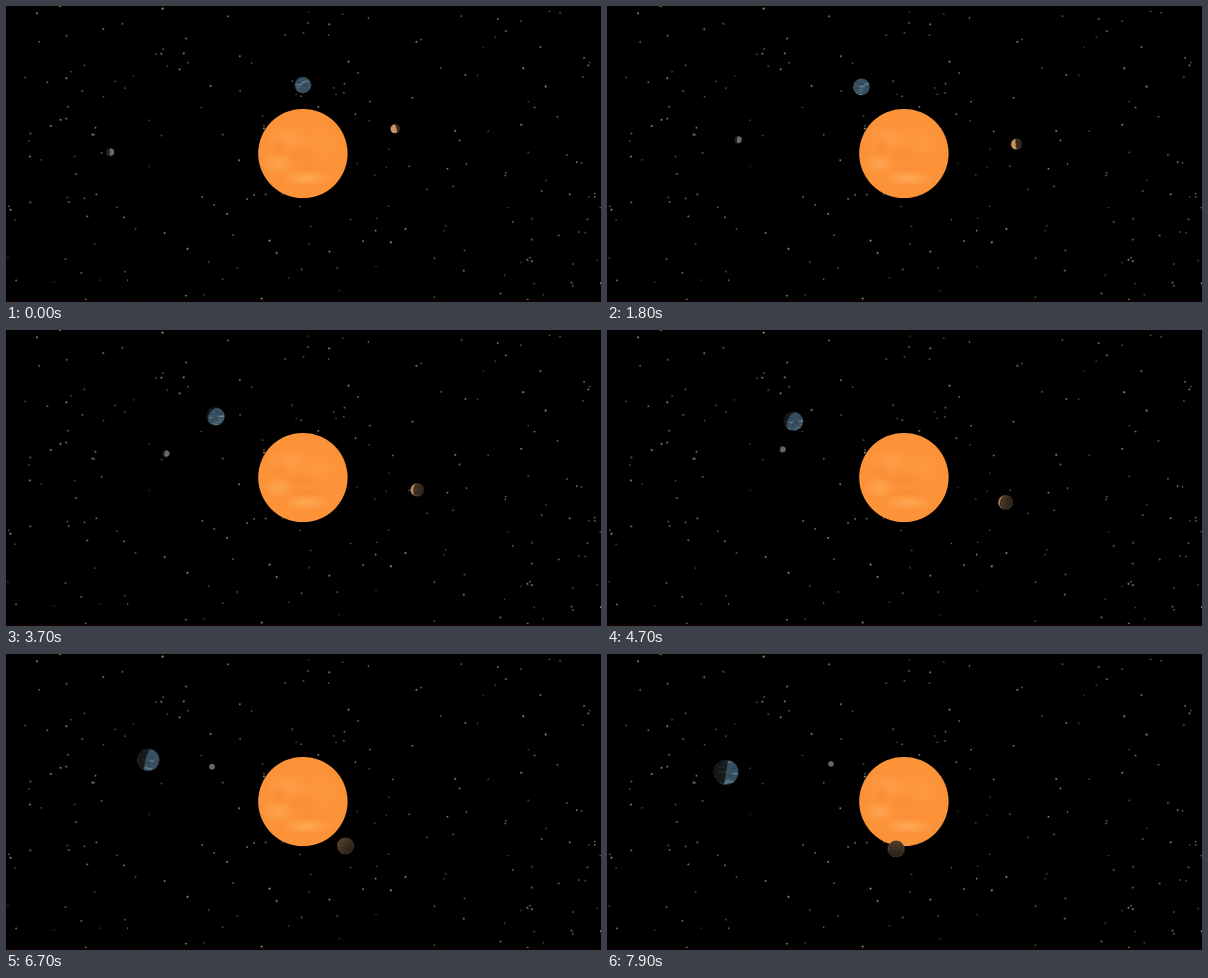
Write an HTML page with a canvas that moves like this. It is 600 px wide and 299 px high and loops after 8000 ms.

```html
<!DOCTYPE html>
<html lang="en">
<head>
<meta charset="utf-8">
<title>Orbits</title>
<style>
html, body { margin: 0; width: 100%; height: 100%; overflow: hidden; background: #000; }
canvas { display: block; }
</style>
</head>
<body>
<canvas id="sky" width="600" height="299"></canvas>
<script>
const W = 600, H = 299, LOOP = 8000, STEP = 100, TAU = Math.PI * 2;
const SUN = { x: 299.4, y: 149, r: 45.1 };
const ctx = document.getElementById('sky').getContext('2d');

// Orbits in perspective: start angle and speed in radians, half width and
// height, vertical lift, depth strength, and the planet's radius.
const PLANETS = [
  { start: -1.471, speed: .1147, width: 207, height: 75, lift: -6, depth: .6, radius: 4.2,
    base: '#6b6761', light: '#8a867f', dark: '#4a4742' },
  { start: 0, speed: -.2, width: 178.5, height: 73.3, lift: 30.2, depth: .5, radius: 12.4,
    base: '#38505f', light: '#7690a2', dark: '#24384a' },
  { start: 1.281, speed: .241, width: 108, height: 44.1, lift: 15.3, depth: .4, radius: 5.05,
    base: '#c69462', light: '#d8aa74', dark: '#ae7c4e' }
];

function random(seed) {
  return () => (seed = (seed * 16807) % 2147483647) / 2147483647;
}

function disc(c, x, y, r, fill) {
  c.fillStyle = fill;
  c.beginPath();
  c.arc(x, y, r, 0, TAU);
  c.fill();
}

function glow(c, x, y, rx, ry, rgb, alpha) {
  c.save();
  c.translate(x, y);
  c.scale(rx, ry);
  const g = c.createRadialGradient(0, 0, 0, 0, 0, 1);
  g.addColorStop(0, `rgba(${rgb},${alpha})`);
  g.addColorStop(1, `rgba(${rgb},0)`);
  disc(c, 0, 0, 1, g);
  c.restore();
}

function drawSun(c) {
  const light = '255,182,104', deep = '240,132,46';
  c.save();
  disc(c, SUN.x, SUN.y, SUN.r, '#fd9339');
  c.clip();
  c.translate(SUN.x, SUN.y);
  glow(c, -14, -16, 24, 14, light, .3);
  glow(c, 18, -10, 17, 18, light, .2);
  glow(c, -25, 10, 16, 11, light, .5);
  glow(c, 4, 25, 26, 8, light, .6);
  glow(c, 0, 3, 22, 8, deep, .35);
  glow(c, -23, -7, 9, 13, deep, .35);
  glow(c, 6, 16, 18, 4, deep, .4);
  c.restore();
}

function makeBackdrop() {
  const layer = document.createElement('canvas');
  layer.width = W;
  layer.height = H;
  const c = layer.getContext('2d'), rnd = random(417);
  c.fillStyle = '#000';
  c.fillRect(0, 0, W, H);
  for (let i = 0; i < 220; i++) {
    disc(c, rnd() * W, rnd() * H, .7 + rnd() * .4, `rgba(175,175,165,${.35 + rnd() * .45})`);
  }
  c.fillStyle = '#0b0004';
  c.fillRect(0, 297, W, 2);
  drawSun(c);
  return layer;
}

function locate(p, seconds) {
  const angle = p.start + p.speed * seconds;
  const far = Math.cos(angle), scale = 1 / (1 + p.depth * far);
  return {
    x: SUN.x + p.width * Math.sin(angle) * scale,
    y: SUN.y - (p.height * far + p.lift) * scale,
    r: p.radius * scale,
    phase: far
  };
}

// Short streaks that follow the bulge of the globe
function drawSurface(p, r, turn) {
  const rnd = random(91);
  ctx.lineWidth = r * .12;
  for (let i = 0; i < 34; i++) {
    const y = (rnd() * 2 - 1) * r, len = (.2 + rnd() * .5) * r;
    const x = ((rnd() * 4 + turn) % 4 - 2) * r;
    ctx.strokeStyle = i % 3 ? p.light : p.dark;
    ctx.globalAlpha = .4 + rnd() * .4;
    ctx.beginPath();
    ctx.moveTo(x, y);
    ctx.quadraticCurveTo(x + len / 2, y + r * .12, x + len, y);
    ctx.stroke();
  }
  ctx.globalAlpha = 1;
}

// Night side, with the terminator as half an ellipse
function drawShade(r, toSun, phase) {
  const R = r + .5, top = TAU * 3 / 4, bottom = TAU / 4;
  const g = ctx.createLinearGradient(R, 0, -R, 0);
  g.addColorStop(0, 'rgba(12,11,11,.62)');
  g.addColorStop(1, 'rgba(12,11,11,.86)');
  ctx.rotate(toSun);
  ctx.fillStyle = g;
  ctx.beginPath();
  ctx.arc(0, 0, R, bottom, top);
  ctx.ellipse(0, 0, Math.abs(phase) * R, R, 0, top, phase > 0 ? bottom : bottom + TAU, phase > 0);
  ctx.fill();
}

function drawPlanet(p, seconds) {
  const { x, y, r, phase } = locate(p, seconds);
  ctx.save();
  ctx.translate(x, y);
  disc(ctx, 0, 0, r, p.base);
  ctx.clip();
  drawSurface(p, r, seconds * .3);
  drawShade(r, Math.atan2(SUN.y - y, SUN.x - x), phase);
  ctx.restore();
}

const backdrop = makeBackdrop();
const begin = performance.now();

function frame() {
  const now = Math.max(0, performance.now() - begin) % LOOP;
  const seconds = Math.floor(now / STEP) * STEP / 1000;
  ctx.drawImage(backdrop, 0, 0);
  PLANETS.forEach(p => drawPlanet(p, seconds));
  requestAnimationFrame(frame);
}
frame();
</script>
</body>
</html>
```
